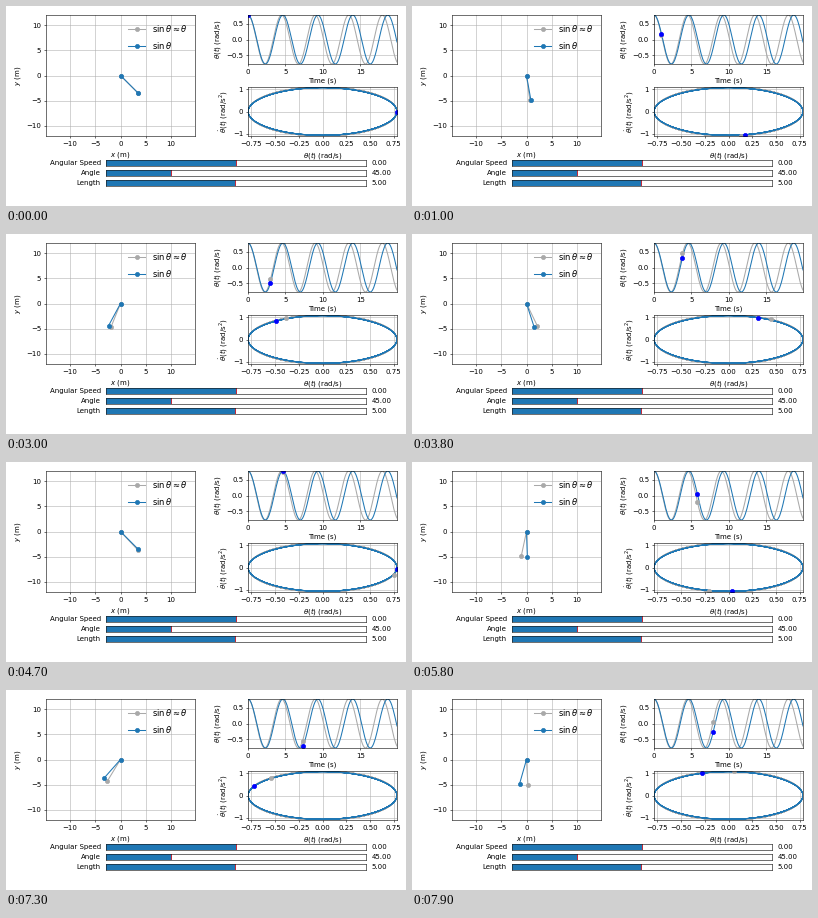
These frames come from a looping animation (400x200 px, 8000 ms). A matplotlib script:

```python
import numpy as np
import matplotlib.pyplot as plt
from matplotlib.animation import FuncAnimation

W, H = 400, 200
FRAMES, STEP = 80, 0.1
G, LENGTH, START = 9.81, 5.0, np.pi / 4
GRAY, BLUE = "darkgray", "C0"

plt.rcParams["font.family"] = "DejaVu Sans"


def linear(t):
    w = np.sqrt(G / LENGTH)
    return START * np.cos(w * t), -START * w * np.sin(w * t)


def nonlinear(n, dt, sub=10):
    """Integrate the full pendulum with RK4."""
    def rate(s):
        return np.array([s[1], -G / LENGTH * np.sin(s[0])])

    h = dt / sub
    state = np.array([START, 0.0])
    out = [state]
    for _ in range(n - 1):
        for _ in range(sub):
            a = rate(state)
            b = rate(state + h / 2 * a)
            c = rate(state + h / 2 * b)
            d = rate(state + h * c)
            state = state + h / 6 * (a + 2 * b + 2 * c + d)
        out.append(state)
    return np.array(out).T


def axes_at(left, top, right, bottom):
    return fig.add_axes([left / W, 1 - bottom / H,
                         (right - left) / W, (bottom - top) / H])


def slider(bottom, name, share, value):
    ax = fig.add_axes([0.25, bottom, 0.65, 0.03])
    ax.set(xlim=(0, 1), ylim=(0, 1), xticks=[], yticks=[])
    ax.axvspan(0, share, color=BLUE)
    ax.axvline(share, color="r", lw=1)
    ax.text(-0.02, 0.5, name, ha="right", va="center")
    ax.text(1.02, 0.5, value, ha="left", va="center")


t = np.arange(200) * STEP
paths = [(GRAY, *linear(t)), (BLUE, *nonlinear(len(t), STEP))]

fig = plt.figure(figsize=(8, 4), dpi=50)

ax_rod = axes_at(40, 9, 189, 130)
ax_rod.set(xlim=(-14.75, 14.75), ylim=(-12, 12),
           xlabel="$x$ (m)", ylabel="$y$ (m)")
ax_time = axes_at(242, 9, 391, 58)
ax_time.set(xlim=(0, t[-1]), ylim=(-START, START),
            xlabel="Time (s)", ylabel=r"$\theta(t)$ (rad/s)")
ax_phase = axes_at(242, 81, 391, 130)
top_speed = np.abs(paths[0][2]).max()
ax_phase.set(xlim=(-START, START), ylim=(-top_speed, top_speed),
             xlabel=r"$\theta(t)$ (rad/s)",
             ylabel=r"$\dot{\theta}(t)$ (rad/s$^2$)")
for ax in (ax_rod, ax_time, ax_phase):
    ax.grid()

labels = [r"$\sin\theta\approx\theta$", r"$\sin\theta$"]
rods, time_dots, phase_dots = [], [], []
for (color, angle, speed), label in zip(paths, labels):
    rods += ax_rod.plot([], [], "o-", color=color, label=label)
    ax_time.plot(t, angle, color=color)
    ax_phase.plot(angle, speed, color=color)
for color in (GRAY, "blue"):
    time_dots += ax_time.plot([], [], "o", color=color)
    phase_dots += ax_phase.plot([], [], "o", color=color)
ax_rod.legend(loc="upper right", fontsize=12, frameon=False,
              labelspacing=0.8)

slider(0.20, "Angular Speed", 0.5, "0.00")
slider(0.15, "Angle", 0.25, "45.00")
slider(0.10, "Length", 4.9 / 9.9, "5.00")


def draw(i):
    for k, (_, angle, speed) in enumerate(paths):
        a = angle[i]
        rods[k].set_data([0, LENGTH * np.sin(a)], [0, -LENGTH * np.cos(a)])
        time_dots[k].set_data([t[i]], [a])
        phase_dots[k].set_data([a], [speed[i]])
    return rods + time_dots + phase_dots


anim = FuncAnimation(fig, draw, frames=FRAMES, interval=100,
                     repeat=True, repeat_delay=0)
plt.show()
```
